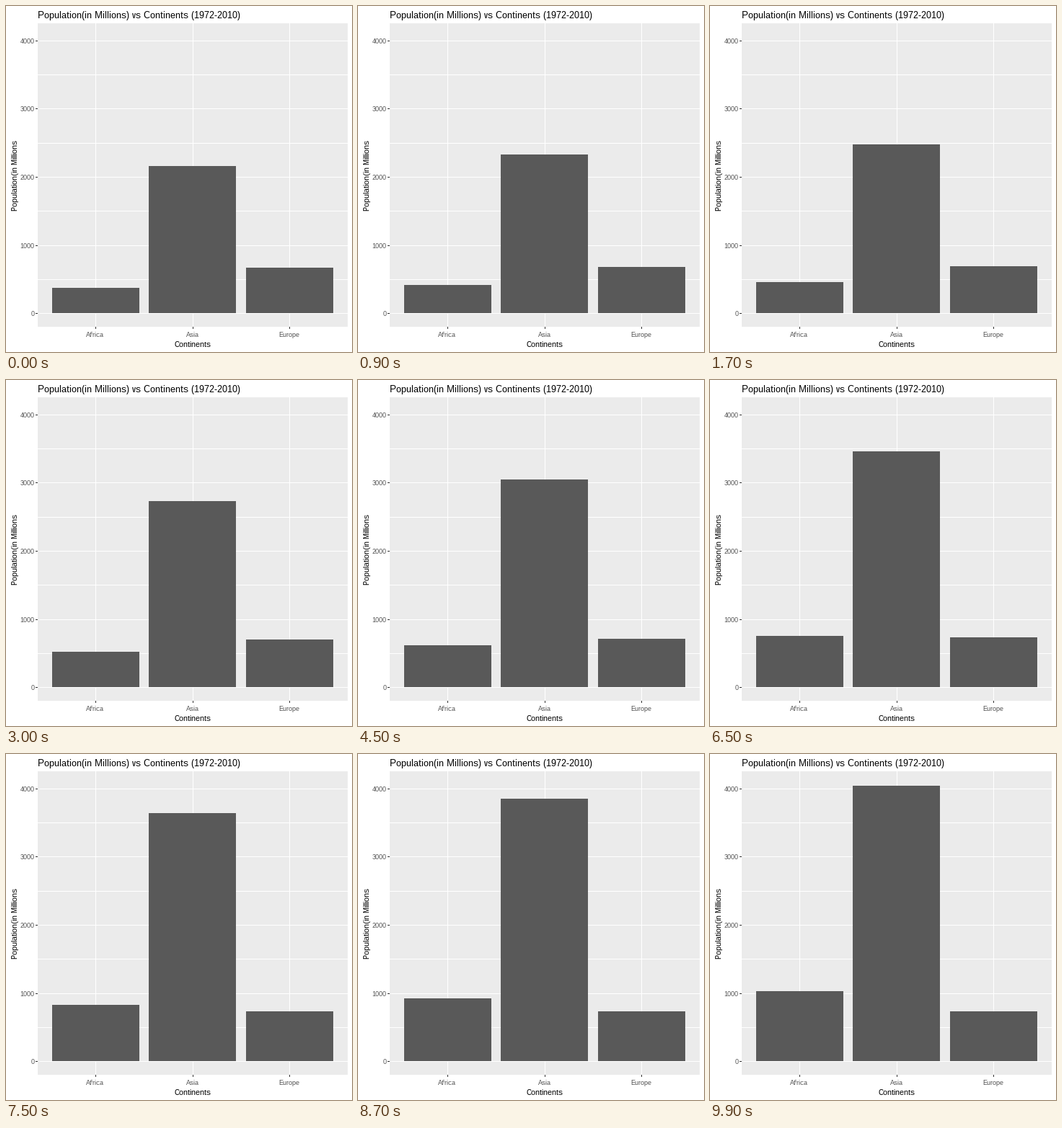
A matplotlib script for the animation above (10 s loop, 480 px wide and 480 px high).

```python
import numpy as np
import matplotlib.pyplot as plt
from matplotlib.animation import FuncAnimation
from matplotlib.patches import Rectangle

SIZE, DPI = 480, 72
FRAMES, INTERVAL = 100, 100
LEFT, TOP, RIGHT, BOTTOM = 44, 24, 474, 445
ZERO = 426
UNIT = 94.5  # pixels per 1000 million
STEP = 134.5  # distance between bar centres
BAR_W = 121

# Whole-pixel glyph hinting keeps the small labels crisp
plt.rcParams.update({
    "font.family": ["Liberation Sans", "DejaVu Sans"],
    "text.hinting": "native",
    "text.hinting_factor": 1,
})

# Name: first bar top, total rise, bow and sway of the growth curve
GROWTH = {
    "Africa": (391, 62, -5.6, 0),
    "Asia": (222, 178, 3.8, 3),
    "Europe": (362.8, 6, 1.55, 0),
}

fig = plt.figure(figsize=(SIZE / DPI, SIZE / DPI), dpi=DPI, facecolor="white")
ax = fig.add_axes([0, 0, 1, 1])
ax.set_xlim(0, SIZE)
ax.set_ylim(SIZE, 0)
ax.axis("off")


def rect(x, y, w, h, color):
    return ax.add_patch(Rectangle((x, y), w, h, facecolor=color, linewidth=0))


def label(x, y, text, size, color="black", ha="center", rotation=0):
    ax.text(x, y, text, fontsize=size, color=color, ha=ha, va="baseline",
            rotation=rotation, rotation_mode="anchor")


def bar_top(u, start, rise, bow, sway):
    grown = rise * u + bow * np.sin(np.pi * u) - sway * np.sin(2 * np.pi * u)
    return round(float(start - grown))


# Panel, grid, ticks and tick labels
rect(LEFT, TOP, RIGHT - LEFT, BOTTOM - TOP, "#EBEBEB")
for value in range(0, 4001, 500):
    y = round(ZERO - value * UNIT / 1000)
    rect(LEFT, y, RIGHT - LEFT, 1, "white")
    if value % 1000 == 0:
        rect(LEFT - 3, y, 3, 1, "#333333")
        label(39.5, y + 4, str(value), 9, "#4D4D4D", ha="right")

bars = []
for k, name in enumerate(GROWTH):
    x = round(124.4 + k * STEP)
    rect(x, TOP, 1, BOTTOM - TOP, "white")
    rect(x, BOTTOM, 1, 3, "#333333")
    label(x - 0.5, 459, name, 9, "#4D4D4D")
    bars.append(rect(round(63.9 + k * STEP), ZERO, BAR_W, 0, "#595959"))

label(LEFT, 17, "Population(in Millions) vs Continents (1972-2010)", 13,
      ha="left")
label(258.5, 473, "Continents", 11)
label(16, 235.5, "Population(in Millions", 11, rotation=90)


def update(i):
    u = i / (FRAMES - 1)
    for bar, curve in zip(bars, GROWTH.values()):
        top = bar_top(u, *curve)
        bar.set_y(top)
        bar.set_height(ZERO - top)
    return bars


anim = FuncAnimation(fig, update, frames=FRAMES, interval=INTERVAL,
                     repeat=True, repeat_delay=0, blit=False)
plt.show()
```
